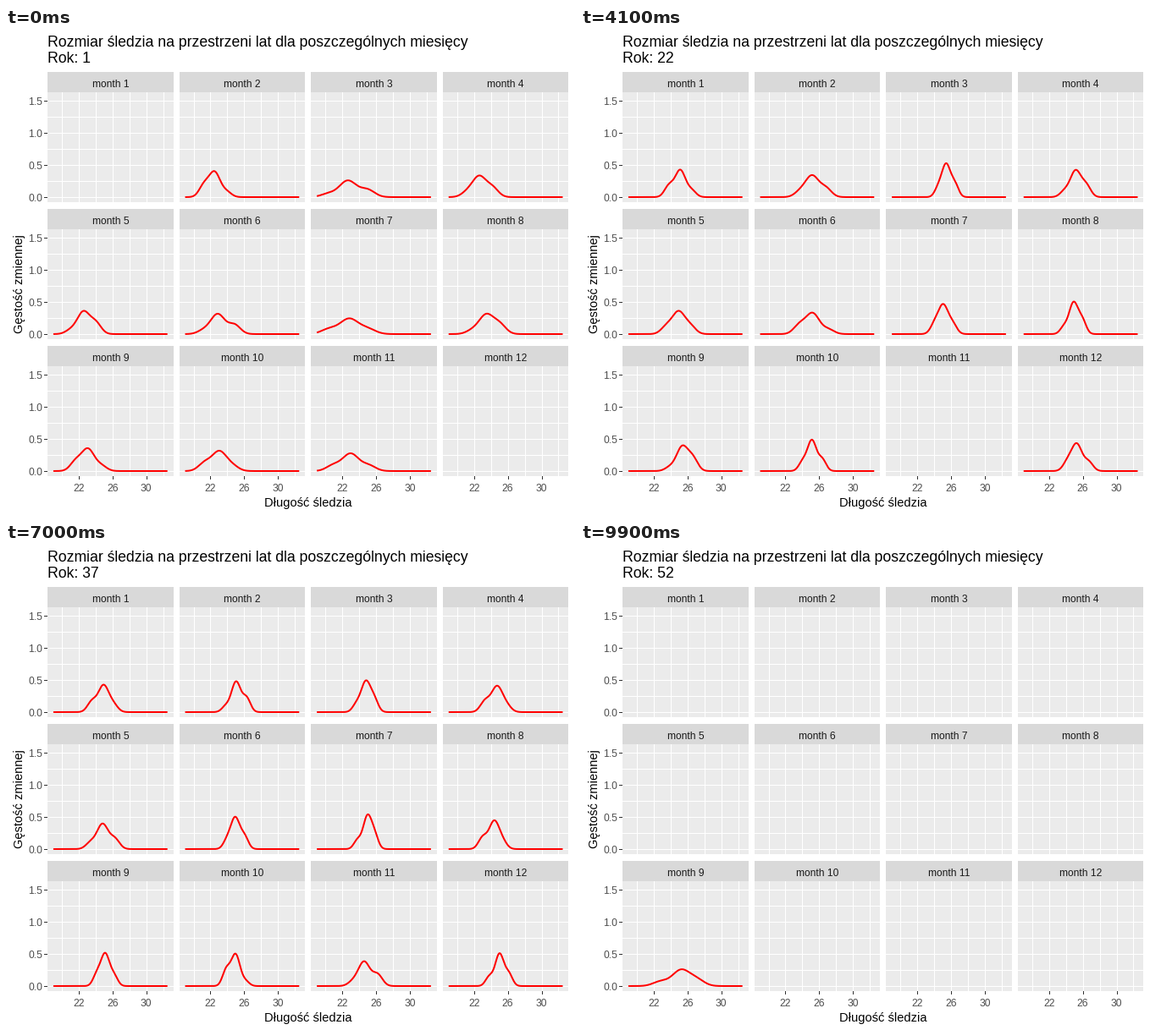
A matplotlib script for the animation above (10 s loop, 672x576 px).

```python
import matplotlib.pyplot as plt
import numpy as np
from matplotlib.animation import FuncAnimation
from matplotlib.patches import Rectangle

plt.rcParams["font.family"] = "Liberation Sans"

W, H, DPI = 672, 576, 96
FRAMES, YEARS = 100, 52
LEFT, COL_STEP, PANEL_W = 49.2, 155.6, 148.4
TOP, ROW_STEP, STRIP_H, PANEL_H = 52, 162, 24, 130
X_MIN, X_MAX = 19.0, 32.5
PX_X, PX_Y = 9.98, 75.7
GRID = np.linspace(X_MIN, X_MAX, 400)

# Yearly trend of the fish length: key years and values between which it runs.
KEY_YEARS = [1, 8, 14, 22, 33, 41, 52]
PEAK = [22.7, 25.9, 26.4, 25.2, 25.2, 24.4, 25.2]
DRIFT = [.08, 0, -.1, -.03, 0, .03, 0]
HEIGHT = [.30, .42, .36, .43, .46, .46, .25]

# Months without any catch.
GAPS = {1: {1, 12}, 22: {11}, YEARS: set(range(1, 13)) - {9}}


def bell(center, width, area):
    z = (GRID - center) / width
    return area * np.exp(-z * z / 2) / (width * np.sqrt(2 * np.pi))


def density(year, month):
    """A main bell with a smaller shoulder on either side, total area one."""
    if month in GAPS.get(year, ()):
        return None
    rng = np.random.default_rng(100 * year + month)
    peak, drift, height = (np.interp(year, KEY_YEARS, values)
                           for values in (PEAK, DRIFT, HEIGHT))
    peak += drift * (month - 6.5) + rng.normal(0, .22)
    height *= np.exp(rng.normal(0, .12))
    main = .65
    width = main / (height * np.sqrt(2 * np.pi))
    left = (1 - main) * rng.uniform(.2, .8)
    near, far = rng.uniform(1.7, 2.4, 2) * width
    return (bell(peak, width, main)
            + bell(peak - near, .85 * width, left)
            + bell(peak + far, .85 * width, 1 - main - left))


curves = [[density(y, m) for m in range(1, 13)] for y in range(1, YEARS + 1)]
stops = np.round(np.arange(YEARS) * (FRAMES - 1) / (YEARS - 1)).astype(int)


def to_x(col, value):
    return LEFT + 6.75 + col * COL_STEP + (value - X_MIN) * PX_X


def to_y(row, value):
    return TOP + row * ROW_STEP + STRIP_H + 124 - value * PX_Y


def px(n):
    return n * 72 / DPI


fig = plt.figure(figsize=(W / DPI, H / DPI), dpi=DPI, facecolor="white")
ax = fig.add_axes([0, 0, 1, 1])
ax.set(xlim=(0, W), ylim=(H, 0))
ax.axis("off")


def box(x0, y0, x1, y1, color):
    x0, x1 = round(x0), round(x1)
    ax.add_patch(Rectangle((x0, y0), x1 - x0, y1 - y0, fc=color, lw=0, aa=False))


def hline(x0, x1, y, color="white"):
    y = round(y) + .5
    ax.plot([round(x0), round(x1)], [y, y], color=color, lw=px(1), snap=False,
            solid_capstyle="butt")


def vline(x, y0, y1, color="white"):
    x = round(x) + .5
    ax.plot([x, x], [y0, y1], color=color, lw=px(1), snap=False,
            solid_capstyle="butt")


def label(x, y, s, size, color="black", ha="center", **kw):
    return ax.text(x, y, s, fontsize=size, color=color, ha=ha, va="baseline", **kw)


lines = []
for month in range(12):
    row, col = divmod(month, 4)
    x0, y0 = LEFT + col * COL_STEP, TOP + row * ROW_STEP
    x1, y1 = x0 + PANEL_W, y0 + STRIP_H
    y2 = y1 + PANEL_H
    box(x0, y0, x1, y1, "#D9D9D9")
    box(x0, y1, x1, y2, "#EBEBEB")
    for v in range(20, 33, 2):
        vline(to_x(col, v), y1, y2)
    for v in np.arange(0, 1.6, .25):
        hline(x0, x1, to_y(row, v))
    label((x0 + x1) / 2, y0 + 18, f"month {month + 1}", 9, "#1A1A1A")
    if col == 0:
        for v in (0, .5, 1, 1.5):
            y = to_y(row, v)
            hline(x0 - 4, x0, y, "#333333")
            label(43, y + 5, f"{v:.1f}", 9, "#4D4D4D", "right")
    if row == 2:
        for v in (22, 26, 30):
            x = to_x(col, v)
            vline(x, y2, y2 + 4, "#333333")
            label(x, 548, str(v), 9, "#4D4D4D")
    lines += ax.plot([], [], color="red", lw=px(2), zorder=3, snap=False,
                     solid_joinstyle="round", solid_capstyle="butt")

label(49, 22, "Rozmiar śledzia na przestrzeni lat dla poszczególnych miesięcy",
      13.2, ha="left")
counter = label(49, 41, "", 13.2, ha="left")
label(357, 566, "Długość śledzia", 11)
label(20, 303, "Gęstość zmiennej", 11, rotation=90, rotation_mode="anchor")


def blend(a, b, t):
    """Curve on the way from a to b; it is absent if either end is."""
    if t == 0:
        return a
    if a is None or b is None:
        return None
    return (1 - t) * a + t * b


def draw(i):
    counter.set_text(f"Rok: {1 + round(i * (YEARS - 1) / (FRAMES - 1))}")
    k = int(np.searchsorted(stops, i, side="right")) - 1
    nxt = min(k + 1, YEARS - 1)
    t = (i - stops[k]) / max(stops[nxt] - stops[k], 1)
    for month, line in enumerate(lines):
        row, col = divmod(month, 4)
        curve = blend(curves[k][month], curves[nxt][month], t)
        if curve is None:
            line.set_data([], [])
        else:
            line.set_data(to_x(col, GRID), to_y(row, curve))
    return [counter, *lines]


anim = FuncAnimation(fig, draw, frames=FRAMES, interval=100, repeat=True,
                     repeat_delay=0, blit=False)
plt.show()
```
